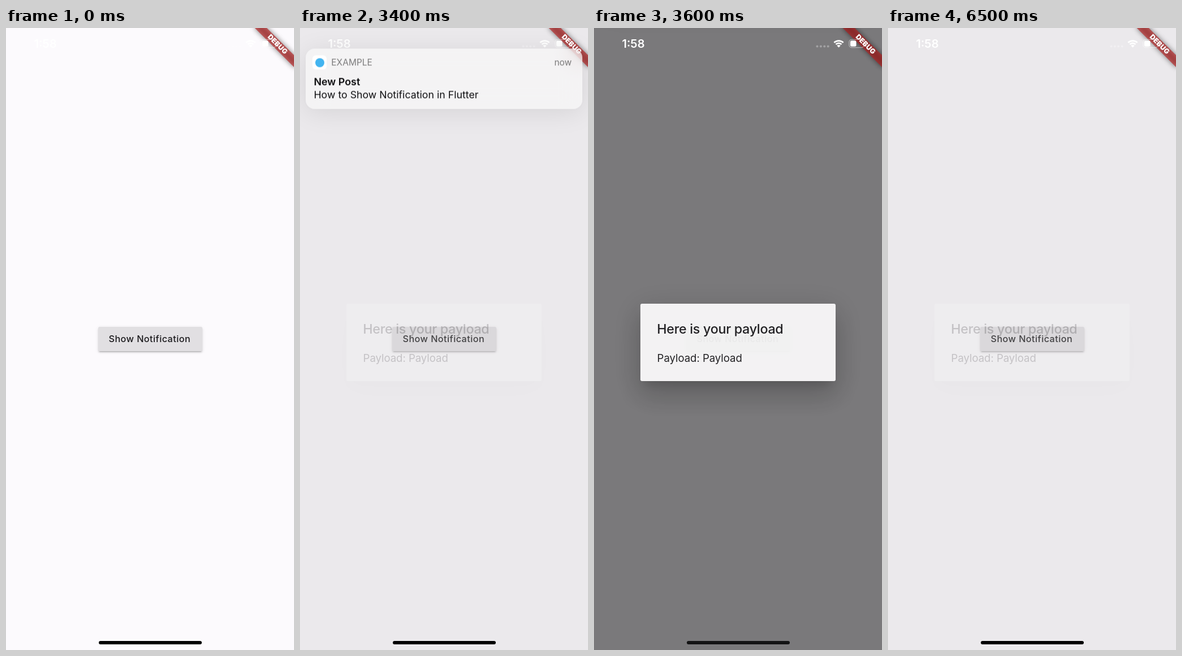
Write an HTML page that moves like this. It is 509 by 1101 pixels and loops after 6600 ms.

```html
<!DOCTYPE html>
<html lang="en">
<head>
<meta charset="utf-8">
<title>Notification demo</title>
<style>
html, body { margin: 0; width: 100%; height: 100%; overflow: hidden; background: #fcfafd; }
#stage { position: relative; width: 509px; height: 1101px; overflow: hidden; background: #fcfafd; font-family: Inter, sans-serif; color: #1b1a1d; }
#stage div, #stage svg { position: absolute; }
/* zero line height puts the capitals' middle on "top" */
#stage .text { line-height: 0; white-space: nowrap; }

#button { left: 162.5px; top: 528.7px; width: 184.6px; height: 43.6px; border-radius: 2.5px; background: #e1dfe2;
  box-shadow: 0 3.6px 1.2px -2.4px #00000026, 0 2.4px 2.4px #0000001c, 0 1.2px 6px #00000018; }
#button .text { left: 19px; top: 21.8px; font-size: 16.2px; font-weight: 500; letter-spacing: .44px; }
#lift { inset: 0; border-radius: 2.5px; box-shadow: 0 3px 5px -1px #0003, 0 4px 7px #0002; }
#ink { inset: 0; border-radius: 2.5px; overflow: hidden; }
#ripple { left: 50%; top: 50%; width: 200px; height: 200px; margin: -100px; border-radius: 50%; background: #000; }

#barrier { inset: 0; background: #000; }
#dialog { left: 82px; top: 488px; width: 345px; height: 137px; }
#shadow, #dialog .card { inset: 0; border-radius: 3px; }
#shadow { box-shadow: 0 13px 18px -8px #0003, 0 28.5px 45px 3.6px #00000024, 0 10.7px 55px 9.5px #0000001f; }
#dialog .card { background: #fff; }
#dialog .title { left: 29.3px; top: 45.2px; font-size: 23.3px; font-weight: 500; letter-spacing: -.3px; }
#dialog .body { left: 29.6px; top: 95.7px; font-size: 18.6px; letter-spacing: -.06px; }

#ribbon { left: 509px; top: 0; width: 0; height: 0; transform: rotate(45deg); }
#ribbon div { left: -50px; top: 34px; width: 100px; height: 14.8px; }
#ribbon .shade { background: #0000007f; filter: blur(4.7px); }
#ribbon .band { background: #b71c1ca0; color: #fff; font-size: 12.3px; font-weight: 900; line-height: 14.8px; text-align: center; letter-spacing: .2px; }

#status { inset: 0; }
#status .text { left: 49.4px; top: 28px; font-size: 20.2px; font-weight: 600; color: #fff; }
#status svg { left: 0; top: 0; }

#banner { left: 10px; top: 49px; width: 489px; height: 107px; border-radius: 16px; background: rgba(250, 250, 251, .6);
  backdrop-filter: blur(18px); box-shadow: 0 6px 46px #00000018, 0 1px 6px #00000008; color: #0c0c0e; }
#banner .icon { left: 12px; top: 12px; width: 25px; height: 25px; border-radius: 6px; background: #fff; }
#banner .dot { left: 4.5px; top: 4.5px; width: 16px; height: 16px; border-radius: 50%; background: #42b4f0; }
#banner .small { top: 25.3px; font-size: 15.5px; color: #000; opacity: .5; }
#banner .head { left: 14.4px; top: 58.5px; font-size: 17.9px; font-weight: 600; }
#banner .body { left: 14.4px; top: 82px; font-size: 17.7px; letter-spacing: .03px; }

#home { left: 163.5px; top: 1085.3px; width: 182px; height: 6px; border-radius: 3px; }
</style>
</head>
<body>
<div id="stage">
  <div id="button">
    <div id="lift"></div>
    <div id="ink"><div id="ripple"></div></div>
    <div class="text">Show Notification</div>
  </div>
  <div id="barrier"></div>
  <div id="dialog">
    <div id="shadow"></div>
    <div class="card"></div>
    <div class="text title">Here is your payload</div>
    <div class="text body">Payload: Payload</div>
  </div>
  <div id="ribbon"><div class="shade"></div><div class="band">DEBUG</div></div>
  <div id="status">
    <div class="text">1:58</div>
    <svg width="509" height="60" fill="none" stroke="#fff">
      <path d="M394.5 32.5h20" stroke-width="4.2" stroke-linecap="round" stroke-dasharray="0 6.4" opacity=".3"/>
      <g transform="translate(422.5 20)" stroke-width="2.7">
        <path d="M1.9 5.9a11.5 11.5 0 0 1 16.2 0M5 9a7 7 0 0 1 10 0"/>
        <path d="M10 14.5l-3.2-3.2a4.4 4.4 0 0 1 6.4 0z" fill="#fff" stroke="none"/>
      </g>
      <rect x="451" y="20.3" width="26" height="14.4" rx="4.5" stroke-width="1.3" opacity=".45"/>
      <path d="M479 25.5v4" stroke-width="1.6" opacity=".45"/>
      <rect x="453" y="22.3" width="10.5" height="10.4" rx="2.5" fill="#fff" stroke="none"/>
    </svg>
  </div>
  <div id="banner">
    <div class="icon"><div class="dot"></div></div>
    <div class="text small" style="left:45.3px">EXAMPLE</div>
    <div class="text small" style="right:18.7px">now</div>
    <div class="text head">New Post</div>
    <div class="text body">How to Show Notification in Flutter</div>
  </div>
  <div id="home"></div>
</div>
<script>
const LOOP = 6600, STEP = 100;
const style = id => document.getElementById(id).style;
const [lift, ripple, barrier, dialog, shadow, banner, home] =
  ['lift', 'ripple', 'barrier', 'dialog', 'shadow', 'banner', 'home'].map(style);

// Linear interpolation through [time, value] keys, clamped at both ends
function track(t, keys) {
  if (t <= keys[0][0]) return keys[0][1];
  for (let i = 1; i < keys.length; i++) {
    const [t0, v0] = keys[i - 1], [t1, v1] = keys[i];
    if (t <= t1) return v0 + (v1 - v0) * (t - t0) / (t1 - t0);
  }
  return keys.at(-1)[1];
}

function bannerOffset(t) {
  if (t < 3331) {
    const p = track(t, [[1300, 0], [1900, 1]]);
    return -200 * (1 - p) ** 3;
  }
  return -12.6 * ((t - 3331) / 69) ** 2;
}

function draw(t) {
  lift.opacity = track(t, [[1100, 0], [1200, .5], [1300, 1], [1500, 1], [1700, 0]]);
  ripple.opacity = track(t, [[1100, 0], [1200, .08], [1400, .1], [1700, 0]]);
  ripple.transform = `scale(${track(t, [[1100, .15], [1400, 1]])})`;

  const dim = track(t, [[3300, 0], [3400, .125], [3500, .756], [3600, .95], [3700, 1], [6400, 1], [6500, .125], [6600, 0]]);
  const fade = track(t, [[3300, 0], [3400, .18], [3500, .65], [3600, .91], [3700, 1], [6400, 1], [6500, .18], [6600, 0]]);
  barrier.opacity = .54 * dim;
  dialog.opacity = fade;
  shadow.opacity = fade;

  banner.transform = `translateY(${bannerOffset(t)}px)`;
  banner.visibility = t > 1300 && t < 3700 ? 'visible' : 'hidden';

  const grey = 26 * dim ** 6;
  home.background = `rgb(${grey}, ${grey}, ${grey + 1})`;
}

const start = performance.now();
function tick() {
  const t = (performance.now() - start) % LOOP;
  draw(Math.floor(t / STEP) * STEP);
  requestAnimationFrame(tick);
}
tick();
</script>
</body>
</html>
```
